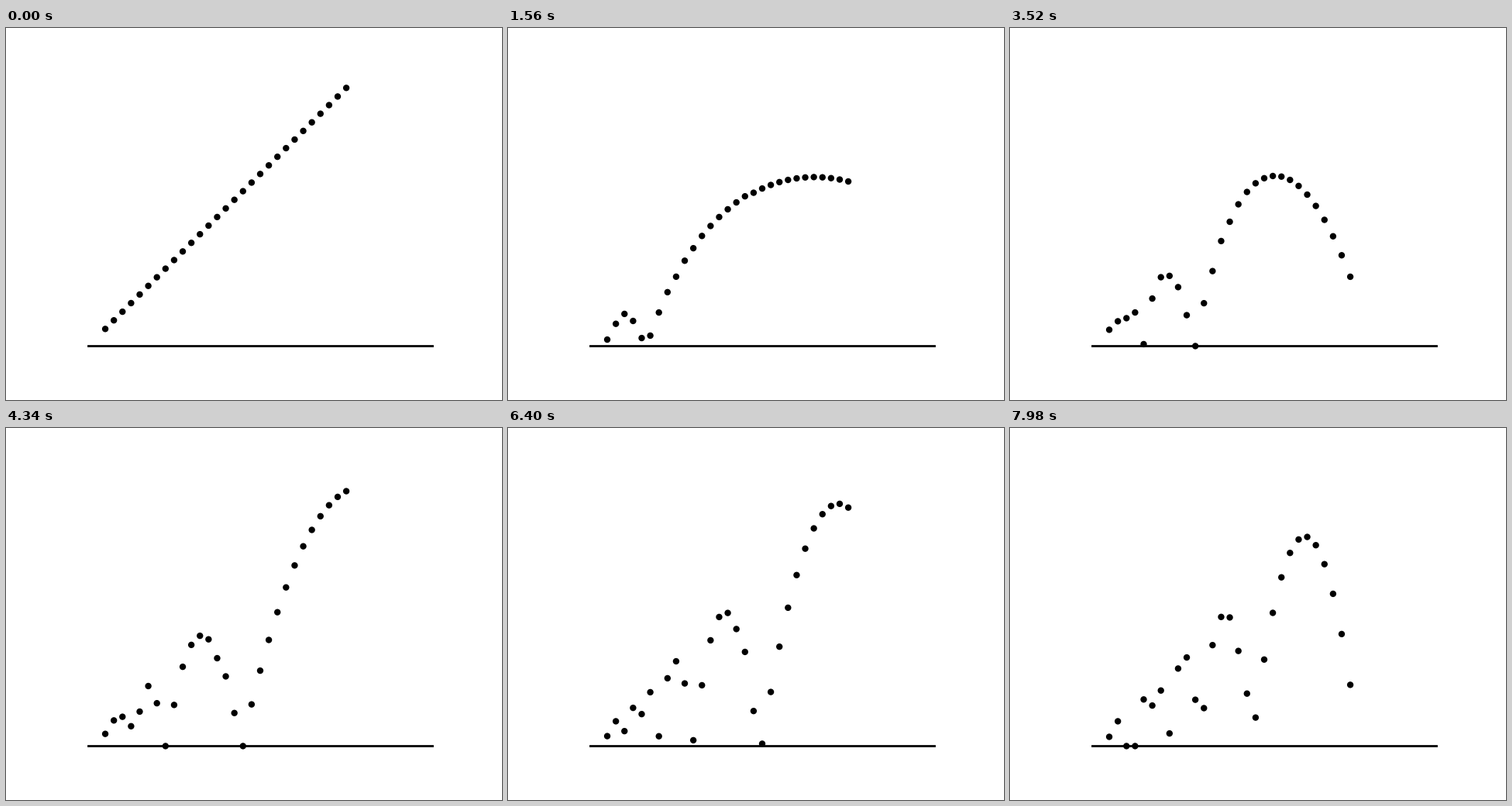
Animation, 640 px wide and 480 px high, one loop 8 s. Source, as a matplotlib script:

```python
import math

import matplotlib.pyplot as plt
from matplotlib.animation import FuncAnimation
from matplotlib.patches import Circle

FRAMES = 400
INTERVAL = 20          # ms
G = 9.81 * 0.002       # units per frame squared
RADIUS = 0.25
FLOOR = 40
HEIGHTS = range(2, 31)


def height_at(h, n):
    """Height of a ball dropped from h, resting one extra frame per bounce."""
    fall = math.sqrt(2 * h / G)
    first = math.ceil(fall)
    if n < first:
        return max(0.0, h - G * (n + 1) ** 2 / 2)
    period = math.ceil(2 * fall) + 1
    t = (n - first) % period
    return max(0.0, G * t * (fall - t / 2))


fig = plt.figure(figsize=(6.4, 4.8), dpi=100, facecolor="white")
ax = fig.add_axes([0.125, 0.11, 0.775, 0.77])
ax.axis("off")

# Equal scale on both axes with a 5 % margin above and below
top = max(HEIGHTS) + RADIUS
span_y = 1.1 * top
span_x = span_y * (0.775 * 640) / (0.77 * 480)
ax.set_ylim(-0.05 * top, 1.05 * top)
ax.set_xlim(FLOOR / 2 - span_x / 2, FLOOR / 2 + span_x / 2)

ax.plot([0, FLOOR], [0, 0], color="black", lw=2)
balls = [ax.add_patch(Circle((h, h), RADIUS, fc="black", ec="black", lw=2))
         for h in HEIGHTS]


def draw(n):
    for h, ball in zip(HEIGHTS, balls):
        ball.center = (h, height_at(h, n))
    return balls


def reset():
    return draw(0)


anim = FuncAnimation(fig, draw, frames=FRAMES, init_func=reset,
                     interval=INTERVAL, repeat=True, repeat_delay=0, blit=False)
plt.show()
```
